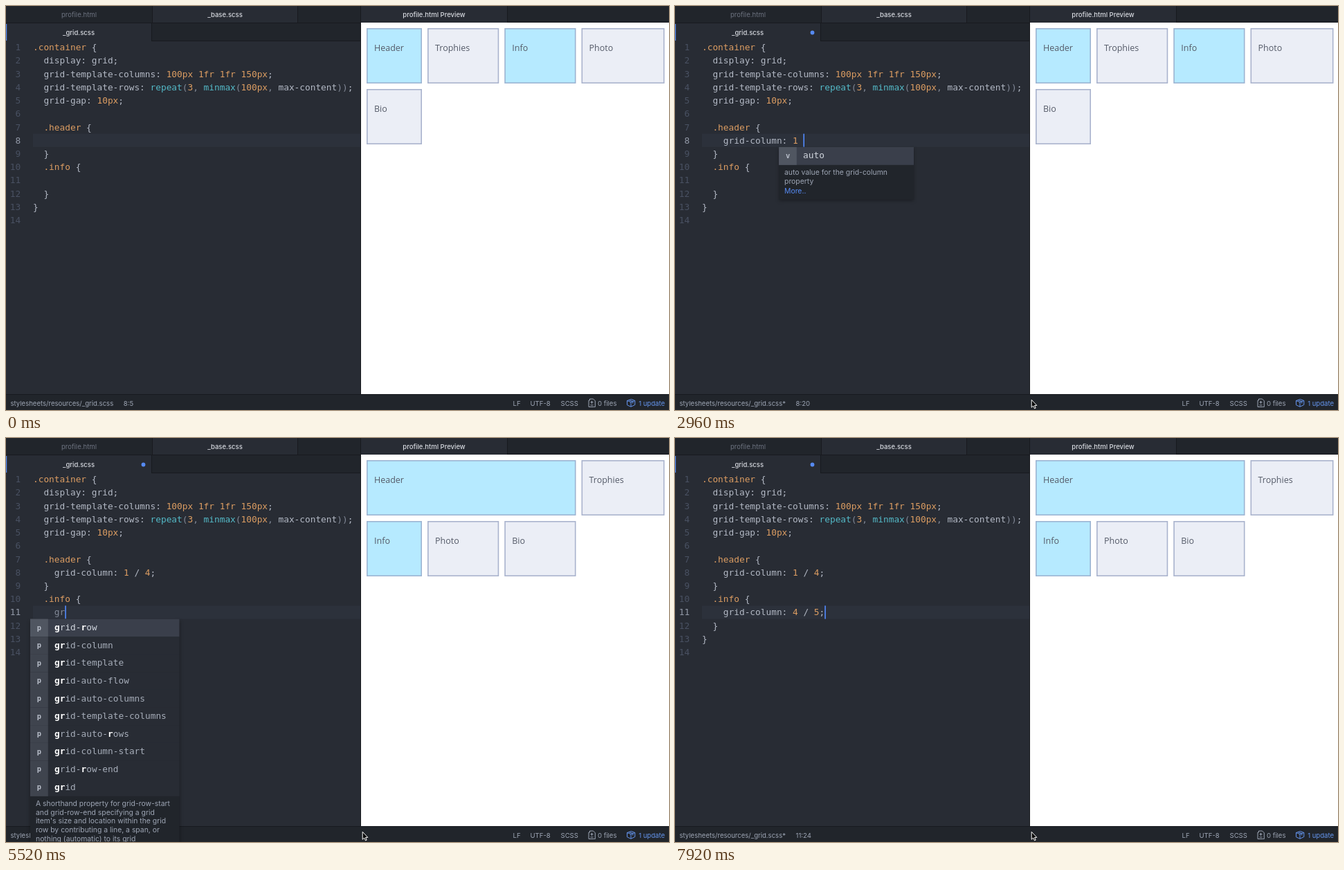
An HTML page with a canvas for the animation above (8 s loop, 958x584 px).

```html
<!DOCTYPE html>
<html lang="en">
<head>
<meta charset="utf-8">
<title>Grid editor</title>
<style>
html, body { margin: 0; width: 100%; height: 100%; overflow: hidden; background: #282c34; }
canvas { display: block; }
</style>
</head>
<body>
<canvas id="stage" width="958" height="584"></canvas>
<script>
const ctx = document.getElementById('stage').getContext('2d');
const LOOP = 8000, BLINK = 320;
const MONO = '12.8px "DejaVu Sans Mono", monospace';
const UI = 'Inter, sans-serif';
const CHAR = 7.706, LINE = 19.23, CODE_X = 39, CODE_Y = 50.05, ROW = 25.6;
const C = {
  bg: '#282c34', bar: '#21252b', edge: '#181a1f', text: '#b3b9c5', dim: '#828997',
  orange: '#dc9d62', cyan: '#54bac8', blue: '#568af2', ui: '#9da5b4', gutter: '#495162'
};

const PROP = 'grid-column: ';
// time, line, text typed on that line
const KEYS = [
  [-480, 8, ''], [960, 8, 'g'], [1280, 8, 'gr'], [1440, 8, 'grid'], [1520, 8, 'grid-c'],
  [2080, 8, PROP], [2800, 8, PROP + '1'], [2960, 8, PROP + '1 '], [3200, 8, PROP + '1 /'],
  [3280, 8, PROP + '1 / '], [3520, 8, PROP + '1 / 4'], [3840, 8, PROP + '1 / 4;'],
  [4480, 9, ''], [4640, 10, ''], [4960, 11, ''], [5120, 11, 'g'], [5520, 11, 'gr'],
  [5680, 11, 'gri'], [5760, 11, 'grid'], [5920, 11, 'grid-'], [6160, 11, 'grid-c'],
  [6480, 11, PROP], [7200, 11, PROP + '4'], [7280, 11, PROP + '4 '], [7360, 11, PROP + '4 /'],
  [7440, 11, PROP + '4 / '], [7600, 11, PROP + '4 / 5'], [7920, 11, PROP + '4 / 5;']
];

const CODE = [
  '.container {',
  '  display: grid;',
  '  grid-template-columns: 100px 1fr 1fr 150px;',
  '  grid-template-rows: repeat(3, minmax(100px, max-content));',
  '  grid-gap: 10px;',
  '',
  '  .header {',
  '',
  '  }',
  '  .info {',
  '',
  '  }',
  '}',
  ''
];

const ROW_ITEMS = ['grid-row', 'grid-column', 'grid-template', 'grid-auto-flow', 'grid-auto-columns',
  'grid-template-columns', 'grid-auto-rows', 'grid-column-start', 'grid-row-end', 'grid'];
const COLUMN_ITEMS = ['grid-column', 'grid-column-start', 'grid-column-end', 'grid-column-gap',
  'grid-auto-columns', 'grid-template-columns'];
const WIDE_ITEMS = [...ROW_ITEMS.slice(0, 9), 'glyph-orientation-horizontal'];

const ROW_HELP = ['A shorthand property for grid-row-start', 'and grid-row-end specifying a grid',
  "item's size and location within the grid", 'row by contributing a line, a span, or',
  'nothing (automatic) to its grid'];
const WIDE_HELP = ['A shorthand property for grid-row-start and grid-row-end',
  "specifying a grid item's size and location within the grid", 'row by contributing a line, a span, or nothing',
  '(automatic) to its grid placement, thereby specifying the', 'inline-start and inline-end edge of its grid area.'];
const COLUMN_HELP = ['A shorthand property for grid-column-', 'start and grid-column-end specifying a',
  "grid item's size and location within the", 'grid row by contributing a line, a span,',
  'or nothing (automatic) to its grid', 'placement, thereby specifying the',
  'inline-start and inline-end edge of its', 'grid area.'];
const AUTO_HELP = ['auto value for the grid-column', 'property'];

function rect(x, y, w, h, color) {
  ctx.fillStyle = color;
  ctx.fillRect(x, y, w, h);
}

function write(str, x, y, color, font, align = 'left') {
  ctx.font = font;
  ctx.textAlign = align;
  ctx.fillStyle = color;
  ctx.fillText(str, x, y);
}

function stroke(d, color, width) {
  ctx.strokeStyle = color;
  ctx.lineWidth = width;
  ctx.stroke(new Path2D(d));
}

const lineTop = n => CODE_Y + (n - 1) * LINE;

function codeLine(str, n) {
  const tokens = /(\.[a-z]+|\d+(?:px|fr)?)|(repeat|minmax)|([(),])|[a-z-]+|./g;
  for (const m of str.matchAll(tokens)) {
    const color = m[1] ? C.orange : m[2] ? C.cyan : m[3] ? C.dim : C.text;
    [...m[0]].forEach((ch, i) =>
      write(ch, CODE_X + (m.index + i) * CHAR, lineTop(n) + 14.1, color, MONO));
  }
}

function tab(x, y, w, h, label, active) {
  if (active) rect(x, y, w, h, C.bg);
  rect(x + w, y, 1, h, C.edge);
  write(label, x + w / 2, y + h / 2 + 3.5, active ? '#d7dae0' : '#6d7380',
    (active ? '500 9.5px ' : '9.6px ') + UI, 'center');
}

function drawTabs(dirty) {
  rect(0, 0, 958, 24, C.bar);
  rect(0, 24, 512, 27, C.bar);
  tab(0, 0, 211, 24, 'profile.html', false);
  tab(212, 0, 209, 24, '_base.scss', true);
  tab(513, 0, 211, 24, 'profile.html Preview', true);
  rect(0, 24, 512, 1, C.edge);
  rect(724, 23, 234, 1, C.edge);
  tab(0, 25, 210, 26, '_grid.scss', true);
  rect(210, 50, 302, 1, C.edge);
  rect(0, 26, 1.2, 24, C.blue);
  if (dirty) {
    ctx.fillStyle = C.blue;
    ctx.beginPath();
    ctx.arc(198.5, 38.5, 2.9, 0, 7);
    ctx.fill();
  }
}

function card(label, x, y, w, hot) {
  rect(x, y, w, 80, hot ? '#9cb4d2' : '#a9b3cd');
  rect(x + 1.6, y + 1.6, w - 3.2, 76.8, hot ? '#b6eaff' : '#ebeef6');
  write(label, x + 11, y + 33, '#555b69', '12.5px "Open Sans", "Noto Sans", sans-serif');
}

function drawPreview(spanned) {
  rect(513, 24, 445, 537, '#fff');
  const xs = [521, 609, 720.25, 831.5], ws = [80, 103.25, 103.25, 120];
  let cell = 0;
  for (const name of ['Header', 'Trophies', 'Info', 'Photo', 'Bio']) {
    const col = cell % 4, span = spanned && name === 'Header' ? 3 : 1;
    const last = col + span - 1;
    card(name, xs[col], 32 + 88 * (cell >> 2), xs[last] + ws[last] - xs[col],
      name === 'Header' || name === 'Info');
    cell += span;
  }
}

function drawStatus(dirty, pos) {
  const font = '9.55px ' + UI, y = 577.6;
  rect(0, 561, 958, 23, C.bar);
  rect(0, 561, 958, 1, C.edge);
  const path = 'stylesheets/resources/_grid.scss' + (dirty ? '*' : '');
  write(path, 6.5, y, C.ui, font);
  write(pos, 6.5 + ctx.measureText(path).width + 14.6, y, C.ui, font);
  write('LF', 732.5, y, C.ui, font);
  write('UTF-8', 757.5, y, C.ui, font);
  write('SCSS', 801.5, y, C.ui, font);
  write('0 files', 855, y, C.ui, font);
  write('1 update', 952, y, '#6494ed', font, 'right');
  stroke('M843.5 568H848.5L851.3 570.8V578M842 570V579.5H849.5M842 570H843.5V568' +
    'M844.5 572.8H848.5M846.5 570.8V574.8M844.5 577H848.5M851.3 578V579.5H849.5', C.ui, 1);
  stroke('M897.5 570.5L903.5 568.5L908.8 570.5V576.5L903 579.3L897.5 576.8Z' +
    'M897.5 570.5L903 572.6L908.8 570.5M903 572.6V579M900.3 569.6L905.8 571.6V574.5', '#6494ed', 1);
}

// Indices of the letters that a fuzzy search highlights
function matched(word, query) {
  const hits = new Set();
  let from = 0;
  [...query].forEach((ch, i) => {
    const initial = query.length === 2 && i ? word.indexOf('-' + ch) + 1 : 0;
    const at = initial || word.indexOf(ch, from);
    hits.add(at);
    from = at + 1;
  });
  return hits;
}

function popup(x, y, w, icon, items, query, help) {
  const listH = items.length * ROW;
  const h = listH + 24.8 + help.length * 12.85;
  ctx.save();
  ctx.shadowColor = 'rgba(0,0,0,.35)';
  ctx.shadowBlur = 5;
  ctx.shadowOffsetY = 2;
  rect(x, y, w, h, C.bar);
  ctx.restore();
  items.forEach((word, i) => {
    const top = y + i * ROW, hits = matched(word, query);
    rect(x, top, w, ROW + .3, i ? C.bg : '#3a3f4b');
    rect(x, top, 25.8, ROW + .3, i ? '#3f444e' : '#505661');
    write(icon, x + 13, top + 16, '#b8bec9', 'bold 10.4px "DejaVu Sans Mono", monospace', 'center');
    [...word].forEach((ch, k) => {
      const hit = hits.has(k);
      write(ch, x + 35 + k * CHAR, top + 16.6, hit ? '#fff' : i ? '#a6adb9' : '#d0d5dd',
        (hit ? 'bold ' : '') + MONO);
    });
  });
  let base = y + listH + 14.2;
  for (const str of help) {
    write(str, x + 8, base, C.ui, '10.4px ' + UI);
    base += 12.85;
  }
  write('More..', x + 8, base + 1.3, C.blue, '10.4px ' + UI);
}

function suggest(line, text, caretX) {
  const y = lineTop(line + 1);
  if (text.endsWith(' ')) popup(caretX - 35.4, y, 195, 'v', ['auto'], '', AUTO_HELP);
  else if (text === 'g') popup(35, y, 295, 'p', WIDE_ITEMS, text, WIDE_HELP);
  else if (text === 'grid-c') popup(35, y, 215.5, 'p', COLUMN_ITEMS, text, COLUMN_HELP);
  else if (/^g[a-z-]+$/.test(text)) popup(35, y, 215.5, 'p', ROW_ITEMS, text, ROW_HELP);
}

function drawPointer(t) {
  if (t < 160) return;
  const k = Math.min(1, (t - 160) / 320), lift = (1 - k) * (1 - k);
  ctx.save();
  ctx.translate(515.2 + 8 * lift, 569.3 + 12 * lift);
  const arrow = new Path2D('M0 0V11L2.5 8.7L4.3 12.6L6 11.8L4.3 8.1H7.6Z');
  ctx.fillStyle = '#000';
  ctx.fill(arrow);
  ctx.strokeStyle = '#fff';
  ctx.lineWidth = 1;
  ctx.stroke(arrow);
  ctx.restore();
}

function draw(t) {
  const [since, line, text] = KEYS.filter(k => k[0] <= t).pop();
  const typedOn = n => (KEYS.filter(k => k[0] <= t && k[1] === n).pop() || [0, n, ''])[2];
  const dirty = t >= 1840 && t < 4160 || t >= 5440;
  const col = line === 9 ? 4 : line === 10 ? 10 : 5 + text.length;
  const caretX = CODE_X + (col - 1) * CHAR;

  rect(0, 0, 958, 584, C.bg);
  rect(CODE_X, lineTop(line), 473, LINE, '#2c313b');
  CODE.forEach((str, i) => {
    const n = i + 1, typed = n === 8 || n === 11 ? typedOn(n) : '';
    write(n, 21.2, lineTop(n) + 14.1, n === line ? '#9299a7' : C.gutter, MONO, 'right');
    if (typed && !typed.includes(':')) write(typed, CODE_X + 4 * CHAR, lineTop(n) + 14.1, C.dim, MONO);
    else codeLine(typed ? '    ' + typed : str, n);
  });
  if (line === 9) {
    rect(CODE_X + 10 * CHAR, lineTop(8) - 1, CHAR, 1, C.blue);
    rect(CODE_X + 2 * CHAR, lineTop(10) - 1, CHAR, 1, C.blue);
  }
  if ((t - since) % (2 * BLINK) < BLINK) rect(caretX, lineTop(line), 1.6, LINE, '#528bff');

  drawTabs(dirty);
  drawPreview(t >= 4240);
  rect(512, 0, 1, 561, C.edge);
  drawStatus(dirty, line + ':' + col);
  suggest(line, text, caretX);
  drawPointer(t);
}

const start = performance.now();
function tick() {
  draw((performance.now() - start) % LOOP);
  requestAnimationFrame(tick);
}
tick();
</script>
</body>
</html>
```
